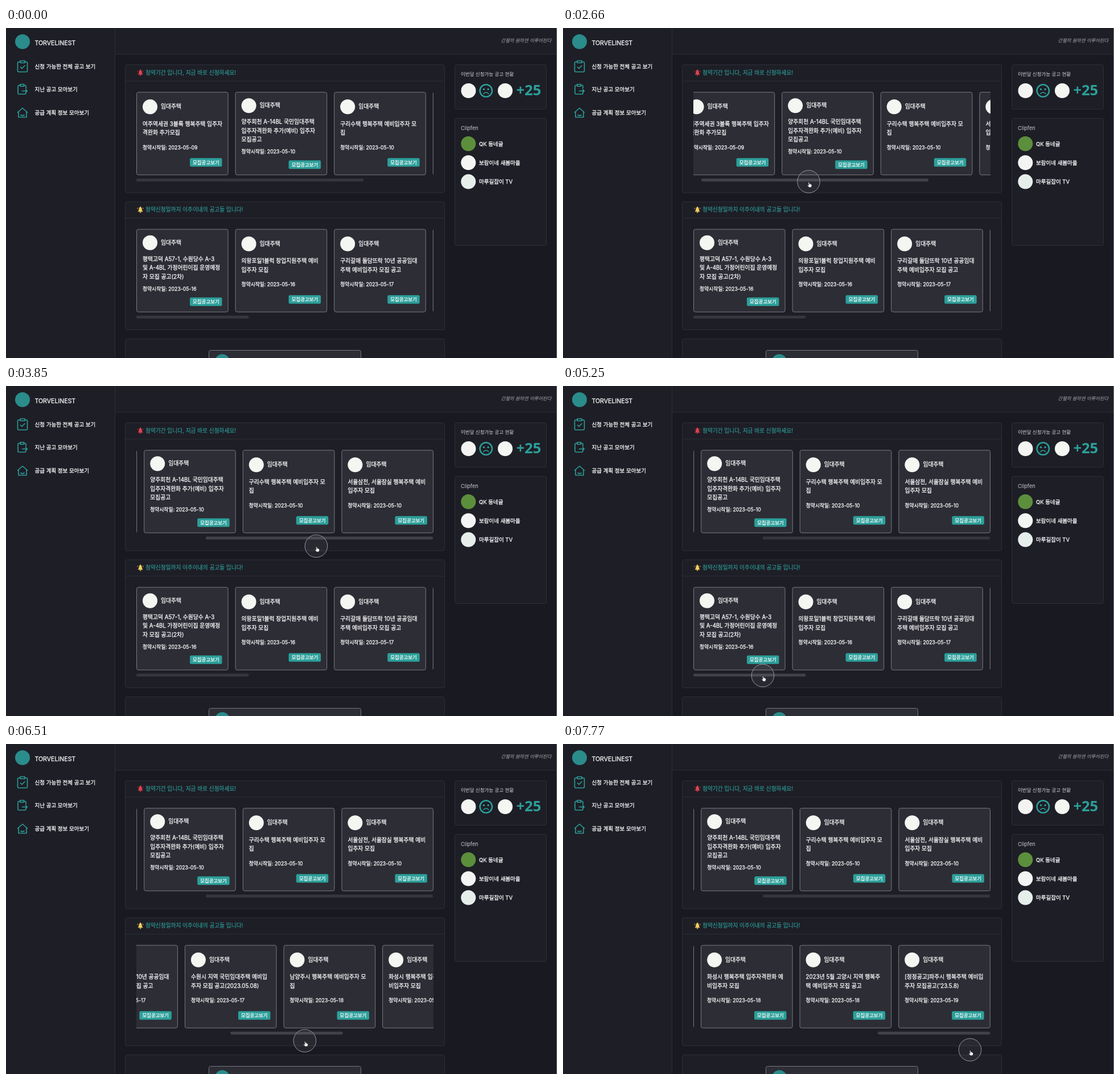
Write an HTML page that moves like this. It is 968 px wide and 579 px high and loops after 8000 ms.

```html
<!DOCTYPE html>
<html lang="ko">
<head>
<meta charset="utf-8">
<style>
  html, body { margin: 0; width: 100%; height: 100%; overflow: hidden; background: #191922; }
  svg { display: block; width: 968px; height: 579px; }
  text { font-family: Inter, "Noto Sans CJK KR", "Noto Sans CJK JP", "Noto Sans CJK", sans-serif; white-space: pre; }
</style>
</head>
<body>
<svg id="stage" viewBox="0 0 968 579"></svg>
<script>
const TEAL = '#2c9f9a', PANEL = '#1e1e26', LINE = '#2e2e37', CARD = '#2d2d35', WHITE = '#f8f8fa';
const STEP = 70, LOOP = 8000, LAST = 7770;
const CARD_W = 160.6, PITCH = 173.6, LEFT = 229.5;

const rect = (x, y, w, h, fill, stroke = 'none', r = 0) =>
  `<rect x="${x}" y="${y}" width="${w}" height="${h}" rx="${r}" fill="${fill}" stroke="${stroke}"/>`;
const circle = (x, y, r, fill) => `<circle cx="${x}" cy="${y}" r="${r}" fill="${fill}"/>`;
const path = (d, attrs) => `<path d="${d}" ${attrs}/>`;
// Text is placed by its left edge and vertical centre; a thin outline gives a medium weight.
const text = (x, cy, size, str, fill = WHITE, outline = 0.28, extra = '') =>
  `<text x="${x}" y="${cy + size * 0.37}" font-size="${size}" fill="${fill}" stroke="${fill}" stroke-width="${outline}" ${extra}>${str}</text>`;
const panel = (x, y, w, h) => rect(x, y, w, h, PANEL, LINE, 3);

function card(index, top, lines, date) {
  const long = lines.length === 3;
  const [head, first, dateY, button] = long ? [23.5, 51.7, 104.2, 127] : [25.5, 55.5, 96.7, 123];
  return `<g transform="translate(${index * PITCH} ${top})">` +
    rect(0, 0, CARD_W, 145, CARD, '#7b7a82', 3) +
    circle(23.5, head, 13, '#f3f6f1') +
    text(42.5, head - 0.5, 9.8, '임대주택') +
    lines.map((line, i) => text(10.5, first + i * 15.5, 9.77, line)).join('') +
    text(10.5, dateY, 8.75, '청약시작일: 2023-05-' + date) +
    rect(93.5, button - 7.5, 56.5, 15, TEAL, 'none', 2.5) +
    text(98.6, button, 8.45, '모집공고보기', '#fff', 0.25) + '</g>';
}

function bell(y, fill, side) {
  return path(`M231.500 ${y + 3.2}q2-1.500 2-4.400q0-3.400 2.600-3.400t2.600 3.400q0 2.900 2 4.400z`, `fill="${fill}"`) +
    circle(236.1, y - 4.7, 1, fill) + circle(236.1, y + 4.2, 1.3, side) +
    path('M232 0a5 5 0 0 0-1 3M240 0a5 5 0 0 1 1 3', `transform="translate(0 ${y - 4})" fill="none" stroke="${side}" stroke-width=".9"`);
}

function section(id, top, title, bellFill, bellSide, thumbWidth, items) {
  return panel(209.5, top, 561, 224.5) +
    path(`M210 ${top + 28.7}H770`, `stroke="${LINE}"`) +
    bell(top + 14, bellFill, bellSide) +
    text(245, top + 13.6, 9.7, title, TEAL, 0.15) +
    `<g clip-path="url(#view)"><g id="row${id}">` +
    items.map(([lines, date], i) => card(i, top + 48.2, lines, date)).join('') + '</g></g>' +
    `<rect id="thumb${id}" x="229" y="${top + 199.7}" width="${thumbWidth}" height="5" rx="2"/>`;
}

const icon = (d) => path(d, `fill="none" stroke="${TEAL}" stroke-width="1.6" stroke-linejoin="round" stroke-linecap="round"`);

const sidebar =
  rect(-1, -1, 192.5, 581, PANEL, LINE) +
  circle(29, 24, 13, '#2a8c8b') +
  text(50.5, 26.3, 10.6, 'TORVELINEST') +
  icon('M25 59.5H22.5a2 2 0 0 0-2 2V75a2 2 0 0 0 2 2H35.5a2 2 0 0 0 2-2V61.5a2 2 0 0 0-2-2H33M25 57.5h8v3.5h-8zM25.5 68.5l2.5 2.5l5-5') +
  text(50.5, 67, 9.5, '신청 가능한 전체 공고 보기') +
  icon('M25 100.5H23a2 2 0 0 0-2 2V114a2 2 0 0 0 2 2H33a2 2 0 0 0 2-2M31.5 100.5H33a2 2 0 0 1 2 2V106M25 98.8h6.5v3.5H25zM28.5 110.5H37M34.5 107.8l2.8 2.7l-2.8 2.7') +
  text(50.5, 107.7, 9.5, '지난 공고 모아보기') +
  icon('M20.5 148L29 140.5L37.5 148M22 147V156.5H36V147M26 152.5q3 2.2 6 0') +
  text(50.5, 148.7, 9.5, '공급 계획 정보 모아보기');

const summary =
  panel(788.5, 64.5, 161, 78) +
  text(799, 81, 8.5, '이번달 신청가능 공고 현황', '#d4d4d8', 0) +
  circle(812.5, 110, 13, '#f3f4f2') +
  `<circle cx="843.3" cy="110" r="10.7" fill="none" stroke="${TEAL}" stroke-width="2.5"/>` +
  circle(839.5, 107.5, 1.7, TEAL) + circle(847.1, 107.5, 1.7, TEAL) +
  icon('M838.8 115.2q4.5-4.4 9 0') +
  circle(877, 110, 13, '#f3f6f1') +
  `<text x="896.5" y="118" font-size="25.5" font-weight="700" fill="${TEAL}" style="font-family:'Open Sans',sans-serif">+25</text>`;

const channels =
  panel(788.5, 158.5, 161, 223) +
  text(799, 176, 9.2, 'Clipfen', '#c8c8cc', 0) +
  [['#5c8f3c', 'QK 동네글'], ['#f4f4f4', '보람이네 새봄마을'], ['#e6eeec', '마루길잡이 TV']]
    .map(([color, name], i) => circle(812.3, 203 + i * 33.3, 13, color) + text(831, 203 + i * 33.3, 9.5, name)).join('');

const openItems = [
  [['여주역세권 3블록 행복주택 입주자', '격완화 추가모집'], '09'],
  [['양주회천 A-14BL 국민임대주택', '입주자격완화 추가(예비) 입주자', '모집공고'], '10'],
  [['구리수택 행복주택 예비입주자 모', '집'], '10'],
  [['서울삼전, 서울잠실 행복주택 예비', '입주자 모집'], '10'],
];
const soonItems = [
  [['평택고덕 A57-1, 수원당수 A-3', '및 A-4BL 가정어린이집 운영예정', '자 모집 공고(2차)'], '16'],
  [['의왕포일1블럭 창업지원주택 예비', '입주자 모집'], '16'],
  [['구리갈매 돌담뜨락 10년 공공임대', '주택 예비입주자 모집 공고'], '17'],
  [['수원시 지역 국민임대주택 예비입', '주자 모집 공고(2023.05.08)'], '17'],
  [['남양주시 행복주택 예비입주자 모', '집'], '18'],
  [['화성시 행복주택 입주자격완화 예', '비입주자 모집'], '18'],
  [['2023년 5월 고양시 지역 행복주', '택 예비입주자 모집 공고'], '18'],
  [['[정정공고]파주시 행복주택 예비입', "주자 모집공고('23.5.8)"], '19'],
];

const pointer =
  '<g id="cursor"><circle id="ring" r="19.8" fill="#fff" fill-opacity=".05" stroke="#98989e"/>' +
  path('M0 0V11L2.6 8.6L4.3 12.4L6 11.6L4.4 8H7.8Z', 'id="arrow" fill="#000" stroke="#fff" stroke-width=".9"') +
  path('M-.8 1Q.2-.4 1.2 1L1.9 4.3Q3 0 4 4.6Q5.2 4 5.5 5.2Q6.7 5 6.7 6.5L6 9.5L5.2 11H.8L-2.7 6.8Q-2.4 5.4-1 6.4L.2 7Z',
    'id="hand" transform="translate(0 .8) scale(.85)" fill="#fff" stroke="#111" stroke-width=".7"') + '</g>';

document.getElementById('stage').innerHTML =
  '<clipPath id="view"><rect x="229" y="0" width="522" height="579"/></clipPath>' +
  rect(191, -1, 778, 47, PANEL, LINE) + sidebar +
  text(869.5, 21.5, 8.3, '간절히 원하면 이루어진다', '#8e8d94', 0.15, 'font-style="italic"') +
  section(1, 64.5, '청약기간 입니다, 지금 바로 신청하세요!', '#e0434f', '#b92f3e', 399, openItems) +
  section(2, 305, '청약신청일까지 이주이내의 공고들 입니다!', '#f3cf62', '#d9a93c', 197.5, soonItems) +
  panel(209.5, 545.5, 561, 60) +
  rect(356.5, 565.5, 267, 60, CARD, '#77767e', 3) +
  circle(380, 585.3, 13, '#2a8c8b') +
  summary + channels + rect(967, 0, 1, 579, '#77777d') + pointer;

// Monotone cubic through [time, ...values] points: rests at the start, runs freely at the end.
function along(points, t) {
  const last = points.length - 1;
  if (t <= points[0][0]) return points[0].slice(1);
  if (t >= points[last][0]) return points[last].slice(1);
  const i = points.findIndex((p) => p[0] > t) - 1;
  const h = points[i + 1][0] - points[i][0], u = (t - points[i][0]) / h;
  return points[0].slice(1).map((_, n) => {
    const k = n + 1;
    const secant = (j) => (points[j + 1][k] - points[j][k]) / (points[j + 1][0] - points[j][0]);
    const slope = (j) => {
      if (j === 0) return 0;
      if (j === last) return secant(j - 1);
      const a = secant(j - 1), b = secant(j);
      return a * b <= 0 ? 0 : 2 * a * b / (a + b);
    };
    const v0 = points[i][k], v1 = points[i + 1][k];
    const ease = u * u * (3 - 2 * u);
    return v0 + (v1 - v0) * ease + h * u * (1 - u) * (slope(i) * (1 - u) - slope(i + 1) * u);
  });
}

const cursorPath = [
  [0, 928, 300], [600, 560, 262], [1120, 416, 268], [2240, 416, 268], [2660, 431.5, 269.5],
  [3150, 479, 275], [3920, 546, 282], [4500, 450, 400], [5110, 351, 508], [5320, 351, 508],
  [6020, 448, 515.3], [6930, 591.5, 525.5], [7770, 715, 536.5],
];
const drags = [
  { id: 1, range: 160.4, travel: 122, hover: [1610, 4060], points: [[2240, 0], [2660, 14], [3150, 53.6], [3850, 122]] },
  { id: 2, range: 855, travel: 324, hover: [4970, LOOP], points: [[5320, 0], [6020, 87.7], [6930, 235.2], [7490, 324]] },
];

const el = (id) => document.getElementById(id);
const show = (id, on) => el(id).setAttribute('visibility', on ? 'visible' : 'hidden');
const clamp01 = (v) => Math.max(0, Math.min(1, v));

function draw(now) {
  const time = Math.min(Math.floor((now % LOOP) / STEP) * STEP, LAST);

  for (const { id, range, travel, hover, points } of drags) {
    const [shift] = along(points, time);
    el('row' + id).setAttribute('transform', `translate(${LEFT - shift * range / travel} 0)`);
    el('thumb' + id).setAttribute('x', 229 + shift);
    const glow = clamp01((time - hover[0]) / 210) * clamp01((hover[1] - time) / 140);
    const tone = 54 + 11 * glow;
    el('thumb' + id).setAttribute('fill', `rgb(${tone},${tone},${tone + 7})`);
  }

  const [x, y] = along(cursorPath, time);
  el('cursor').setAttribute('transform', `translate(${x} ${y})`);
  const pressed = (time >= 2100 && time < 3990) || time >= 5250;
  const tapped = time >= 1400 && time < 1540;
  const travelling = time < 1120 || (time >= 3990 && time < 5110);
  el('ring').setAttribute('r', tapped ? 14.5 : 19.8);
  show('ring', pressed || tapped);
  show('arrow', time > 0 && travelling);
  show('hand', !travelling);
  requestAnimationFrame(draw);
}
draw(performance.now());
</script>
</body>
</html>
```
